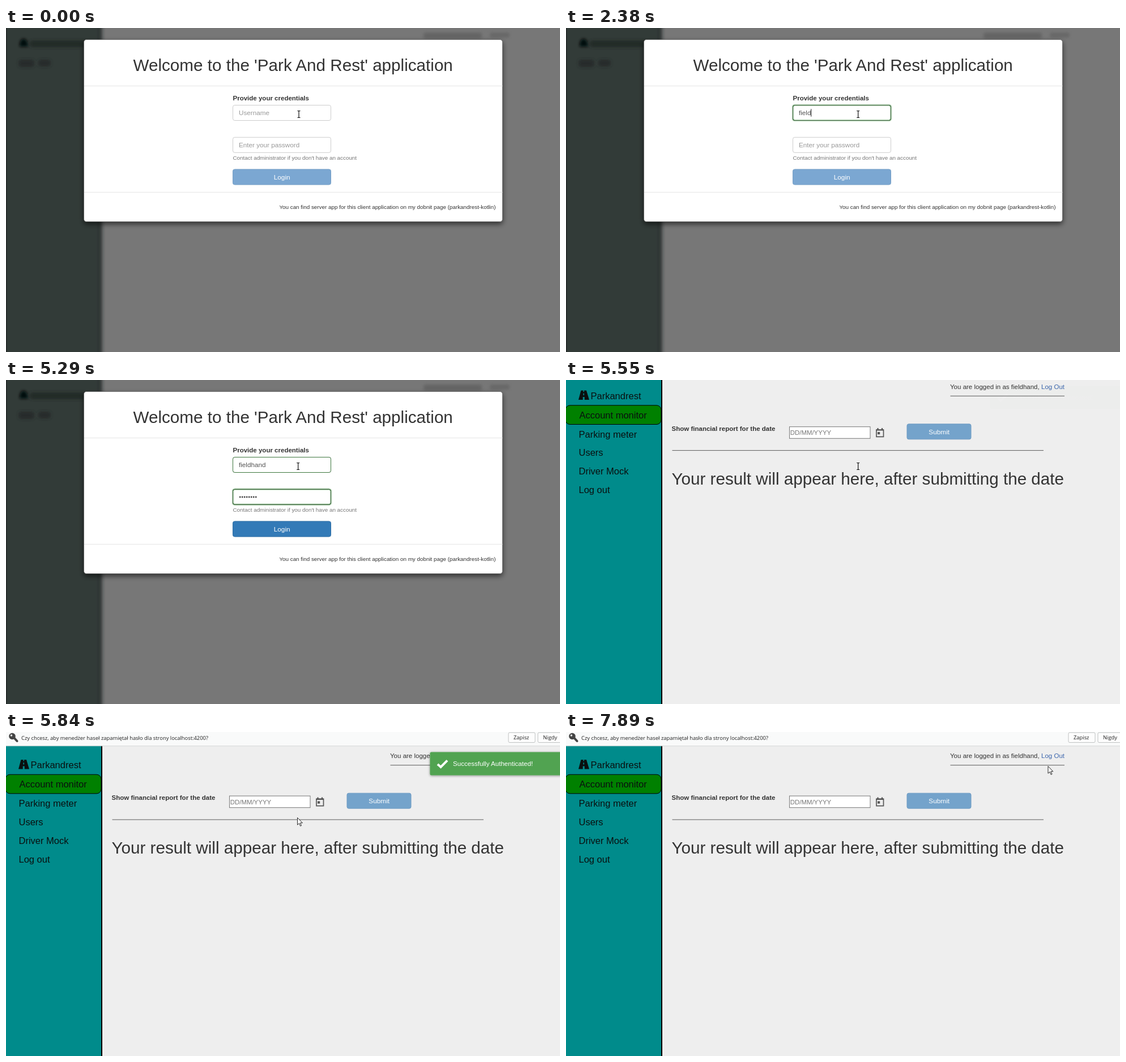
These frames come from a looping animation (978 px wide and 573 px high, 8 s). An HTML page:

```html
<!DOCTYPE html>
<html lang="en">
<head>
<meta charset="utf-8">
<title>Login walkthrough</title>
<style>
  html, body { margin: 0; width: 100%; height: 100%; overflow: hidden; background: #eee; }
  svg { display: block; font-family: "Liberation Sans", Arial, sans-serif; }
  text { white-space: pre; }
  .base { font-size: 11.53px; fill: #333; }
  .input { font-size: 11.7px; fill: #555; }
  .hint { fill: #999; }
  .bold { font-weight: bold; }
  .small { font-size: 9.85px; }
  .title { font-size: 29.65px; fill: #333; }
  .button { font-size: 11.8px; fill: #fff; text-anchor: middle; }
  .menu { font-size: 16.5px; fill: #0a0f0f; }
  .bar { font: 9.37px "Open Sans", "Noto Sans", sans-serif; fill: #222; }
  .field { fill: none; stroke-width: 1; }
  .glow { fill: none; stroke-width: 4; stroke-opacity: .3; }
  .caret { stroke: #222; stroke-width: 1; }
</style>
</head>
<body>
<svg id="stage" width="978" height="573" viewBox="0 0 978 573">
  <defs>
    <filter id="soft" x="-20%" y="-60%" width="140%" height="220%"><feGaussianBlur stdDeviation="2.4"/></filter>
    <filter id="edge" x="-20%" y="-5%" width="140%" height="110%"><feGaussianBlur stdDeviation="3"/></filter>
    <filter id="modalShadow" x="-5%" y="-10%" width="110%" height="120%">
      <feDropShadow dx="0" dy="4" stdDeviation="5" flood-opacity=".6"/>
    </filter>
    <filter id="toastShadow" x="-5%" y="-25%" width="110%" height="150%">
      <feDropShadow dx="0" dy="1" stdDeviation="2" flood-opacity=".42"/>
    </filter>
    <g id="fieldShape"><rect x="400.5" y="136.5" width="173" height="27" rx="3.3"/></g>
  </defs>

  <g id="login">
    <rect width="978" height="573" fill="#777"/>
    <g filter="url(#edge)">
      <rect x="-20" y="-20" width="189" height="613" fill="#323a39"/>
      <rect x="165" y="-20" width="4" height="613" fill="#1c2221"/>
    </g>
    <rect width="2" height="573" fill="#282e2d"/>
    <g filter="url(#soft)">
      <path d="M24 33q0-14 7-14t8 14z" fill="#050908"/>
      <rect x="42" y="22" width="100" height="12" rx="5" fill="#222928"/>
      <rect x="22" y="56" width="28" height="13" rx="5" fill="#252c2b"/>
      <rect x="57" y="56" width="22" height="12" rx="5" fill="#252c2b"/>
      <rect x="737" y="8" width="103" height="11" rx="4" fill="#656565"/>
      <rect x="854" y="8" width="35" height="9" rx="4" fill="#686868"/>
    </g>
    <rect x="137.5" y="20.5" width="739" height="322" rx="4.5" fill="#fff" stroke="#4a4a4a" stroke-opacity=".6" filter="url(#modalShadow)"/>
    <path d="M138 102.5H876.500M138 290.500H876.500" stroke="#e5e5e5"/>
    <text class="title" x="224.500" y="75.500">Welcome to the 'Park And Rest' application</text>
    <text class="base bold" x="400.500" y="128">Provide your credentials</text>
    <g id="userField"></g>
    <g id="passField" transform="translate(0 56.800)"></g>
    <text id="userText" class="input" x="411" y="154"></text>
    <text id="passHint" class="input hint" x="411" y="211">Enter your password</text>
    <g id="dots" fill="#444"></g>
    <path id="caret" class="caret" d="M0 0V13.500"/>
    <text class="small" x="400.500" y="233" fill="#777">Contact administrator if you don't have an account</text>
    <rect id="loginButton" x="400.500" y="249.900" width="173" height="27.200" rx="3.300"/>
    <text class="button" x="487.200" y="267.700">Login</text>
    <text class="small" x="864.500" y="319.500" text-anchor="end" fill="#333">You can find server app for this client application on my dobnit page (parkandrest-kotlin)</text>
  </g>

  <g id="home">
    <rect width="978" height="573" fill="#eee"/>
    <g id="page">
      <rect y="-10" width="168.500" height="600" fill="#008b8b"/>
      <path d="M169 -10V590" stroke="#000" stroke-width="2"/>
      <path d="M26.500 18.500H36L41 35H22Z" fill="#0a0f0f"/>
      <path d="M31.250 18V21M31.250 23.500V27" stroke="#008b8b" stroke-width="1.600"/>
      <path d="M31.250 30V35.500" stroke="#008b8b" stroke-width="3"/>
      <rect x="-1" y="44.800" width="169" height="33.700" rx="8" fill="#008000" stroke="#000"/>
      <g id="menu" class="menu"></g>
      <text class="base" x="678" y="16">You are logged in as fieldhand,</text>
      <text class="base" x="880" y="16" text-anchor="end" style="fill:#3c66ad">Log Out</text>
      <path d="M678.500 28.300H880M187.500 124.600H843" stroke="#5a5a5a"/>
      <text class="base bold" x="186.500" y="90">Show financial report for the date</text>
      <rect x="394.500" y="82.700" width="142.500" height="20.600" fill="#fff" stroke="#767676"/>
      <text x="395.700" y="97.300" font-size="11.450" fill="#777">DD/MM/YYYY</text>
      <path d="M548 88H560.500V100.300H548Z" fill="none" stroke="#555" stroke-width="1.700"/>
      <path d="M547.500 88.500H561M550.500 85V88M558 85V88" stroke="#555" stroke-width="2.200"/>
      <rect x="550" y="92" width="4.200" height="4.200" fill="#555"/>
      <rect x="602" y="77.800" width="113" height="27" rx="3" fill="#74a3cb" stroke="#6f9cc4"/>
      <text class="button" x="658.700" y="95.500">Submit</text>
      <text class="title" x="186.500" y="184.500">Your result will appear here, after submitting the date</text>
    </g>
    <g id="toast">
      <rect x="748.500" y="10.200" width="260" height="41" rx="2.500" fill="#51a351" filter="url(#toastShadow)"/>
      <path d="M762 31.500L767.500 36.500L779 25" fill="none" stroke="#fff" stroke-width="4"/>
      <text x="789" y="34.700" font-size="11.600" fill="#fff">Successfully Authenticated!</text>
    </g>
    <g id="prompt">
      <rect y="-5" width="978" height="29.500" fill="#f9fafa"/>
      <path d="M0 24.700H978" stroke="#d5d8d8"/>
      <path d="M13 9L19.500 16" stroke="#444" stroke-width="4" stroke-linecap="round"/>
      <circle cx="11" cy="7.500" r="5.800" fill="#444"/>
      <circle cx="9.500" cy="6" r="1.700" fill="#f9fafa"/>
      <text class="bar" x="27" y="13.900">Czy chcesz, aby menedżer haseł zapamiętał hasło dla strony localhost:4200?</text>
      <g fill="#fdfdfd" stroke="#bfc2c2">
        <rect x="887" y="1" width="47" height="17.500" rx="2"/>
        <rect x="939" y="1" width="60" height="17.500" rx="2"/>
      </g>
      <text class="bar" x="896" y="13.400">Zapisz</text>
      <text class="bar" x="948" y="13.400">Nigdy</text>
    </g>
  </g>

  <g id="cursor">
    <path id="beam" d="M-2.500 -6H-.7L0 -5.300L.7 -6H2.500M0 -5.300V5.300M-2.500 6H-.7L0 5.300L.7 6H2.500" fill="none" stroke="#111" stroke-width="1.200"/>
    <path id="arrow" d="M.5 .5V13.200L3.500 10.500L5.600 15.300L7.500 14.500L5.400 9.800H9.400Z" fill="#fff" stroke="#111" stroke-width=".9"/>
    <path id="hand" d="M-1.700 12V1Q0 -1.500 1.500 1V6.500Q3 5.300 4.200 7Q5.800 6 6.700 7.800Q8.600 7.200 8.700 9.500V13Q8.500 16 7 19.300H-1Q-2.500 15.500 -5.500 12.500Q-6.300 9.800 -3.700 10.500ZM1.500 6.500V10M4.200 7V10.500M6.700 7.800V10.800" fill="#fff" stroke="#111" stroke-width=".9"/>
  </g>
</svg>
<script>
const LOOP = 8000, FADE = 150;
const USER = 'fieldhand';
const userKeys = [1650, 1900, 2140, 2260, 2380, 2510, 2630, 2750, 2870];
const passKeys = [3540, 3660, 3900, 4080, 4200, 4380, 4500, 4740];
const times = { userFocus: 1170, userValid: 2140, passFocus: 3250, passValid: 4500, caretOff: 5290, enter: 5550, dismiss: 7600, gone: 7890 };
// time, x, y of the pointer's hot spot
const track = [
  [0, 517, 152.5], [480, 517, 152.5], [540, 515.7, 152.5], [5720, 515.7, 152.5],
  [5780, 514, 151], [6480, 514, 151], [6640, 515.5, 155.5], [6780, 515.5, 155.5],
  [6880, 548, 168], [6940, 630, 160], [7000, 720, 134], [7050, 780, 106],
  [7110, 822, 83], [7170, 837.5, 71.5], [7230, 846, 64], [7290, 850.5, 60]
];

const $ = id => document.getElementById(id);
const clamp = v => Math.max(0, Math.min(1, v));
const ramp = (t, start, length = FADE) => clamp((t - start) / length);
const count = (keys, t) => keys.filter(k => t >= k).length;
const show = (el, on) => el.setAttribute('display', on ? 'inline' : 'none');
const move = (el, x, y) => el.setAttribute('transform', `translate(${x} ${y})`);

function buildField(host) {
  const layer = (cls, color) => `<use href="#fieldShape" class="${cls}" stroke="${color}"/>`;
  host.innerHTML =
    `<use href="#fieldShape" fill="#fff" stroke="#ccc"/>
     <g>${layer('glow', '#66afe9')}${layer('field', '#66afe9')}</g>
     <g>${layer('field', '#3c763d')}</g>
     <g>${layer('glow', '#67b168')}${layer('field', '#2b542c')}</g>`;
  return [...host.querySelectorAll('g')];
}

const userLayers = buildField($('userField'));
const passLayers = buildField($('passField'));

$('menu').innerHTML = [
  ['Parkandrest', 43.5, 33.5], ['Account monitor', 23.5, 67.5], ['Parking meter', 22.5, 101.5],
  ['Users', 22.5, 134.3], ['Driver Mock', 22.5, 167.2], ['Log out', 22.5, 200.2]
].map(([label, x, y]) => `<text x="${x}" y="${y}">${label}</text>`).join('');

$('dots').innerHTML = passKeys.map((_, i) => `<circle cx="${413.2 + i * 4}" cy="207" r="1.45"/>`).join('');

function paintField(layers, t, focus, valid, blur) {
  const focused = ramp(t, focus - 30) - ramp(t, blur - 30);
  const green = ramp(t, valid - 30);
  [focused * (1 - green), green, focused * green].forEach((v, i) => layers[i].setAttribute('opacity', v));
}

function paintLogin(t) {
  paintField(userLayers, t, times.userFocus, times.userValid, times.passFocus);
  paintField(passLayers, t, times.passFocus, times.passValid, LOOP * 2);

  const typed = count(userKeys, t), userText = $('userText');
  userText.textContent = typed ? USER.slice(0, typed) : 'Username';
  userText.classList.toggle('hint', !typed);

  const filled = count(passKeys, t);
  show($('passHint'), !filled);
  [...$('dots').children].forEach((dot, i) => show(dot, i < filled));

  const inPass = t >= times.passFocus;
  const x = inPass ? 411.3 + filled * 4 : 411.3 + (typed ? userText.getComputedTextLength() : 0);
  move($('caret'), x, inPass ? 200 : 143.2);
  show($('caret'), t >= times.userFocus && t < times.caretOff);

  const ready = t >= times.passValid;
  $('loginButton').setAttribute('fill', ready ? '#337ab7' : '#7ba7d2');
  $('loginButton').setAttribute('stroke', ready ? '#2e6da4' : '#769fc5');
}

function paintHome(t) {
  const slide = ramp(t, times.enter + 30, 230);
  move($('page'), 0, 30.4 * slide);
  move($('toast'), 0, 25.4 * slide);
  move($('prompt'), 0, 25.4 * (slide - 1));
  show($('prompt'), slide > 0);
  $('toast').setAttribute('opacity', ramp(t, times.enter, 290) * (1 - ramp(t, times.dismiss - 40, 320)));
}

function paintCursor(t) {
  const next = track.findIndex(p => p[0] > t);
  const b = next < 0 ? track[track.length - 1] : track[next];
  const a = next < 0 ? b : track[next - 1];
  const k = b === a ? 0 : (t - a[0]) / (b[0] - a[0]);
  move($('cursor'), a[1] + (b[1] - a[1]) * k, a[2] + (b[2] - a[2]) * k);
  const beam = t < 5780, hand = t >= 7150 && t < times.gone;
  show($('beam'), beam);
  show($('hand'), hand);
  show($('arrow'), !beam && !hand);
}

function render(t) {
  const entered = t >= times.enter;
  show($('login'), !entered);
  show($('home'), entered);
  if (entered) paintHome(t); else paintLogin(t);
  paintCursor(t);
}

const started = performance.now();
function tick() {
  render((performance.now() - started) % LOOP);
  requestAnimationFrame(tick);
}
tick();
</script>
</body>
</html>
```
